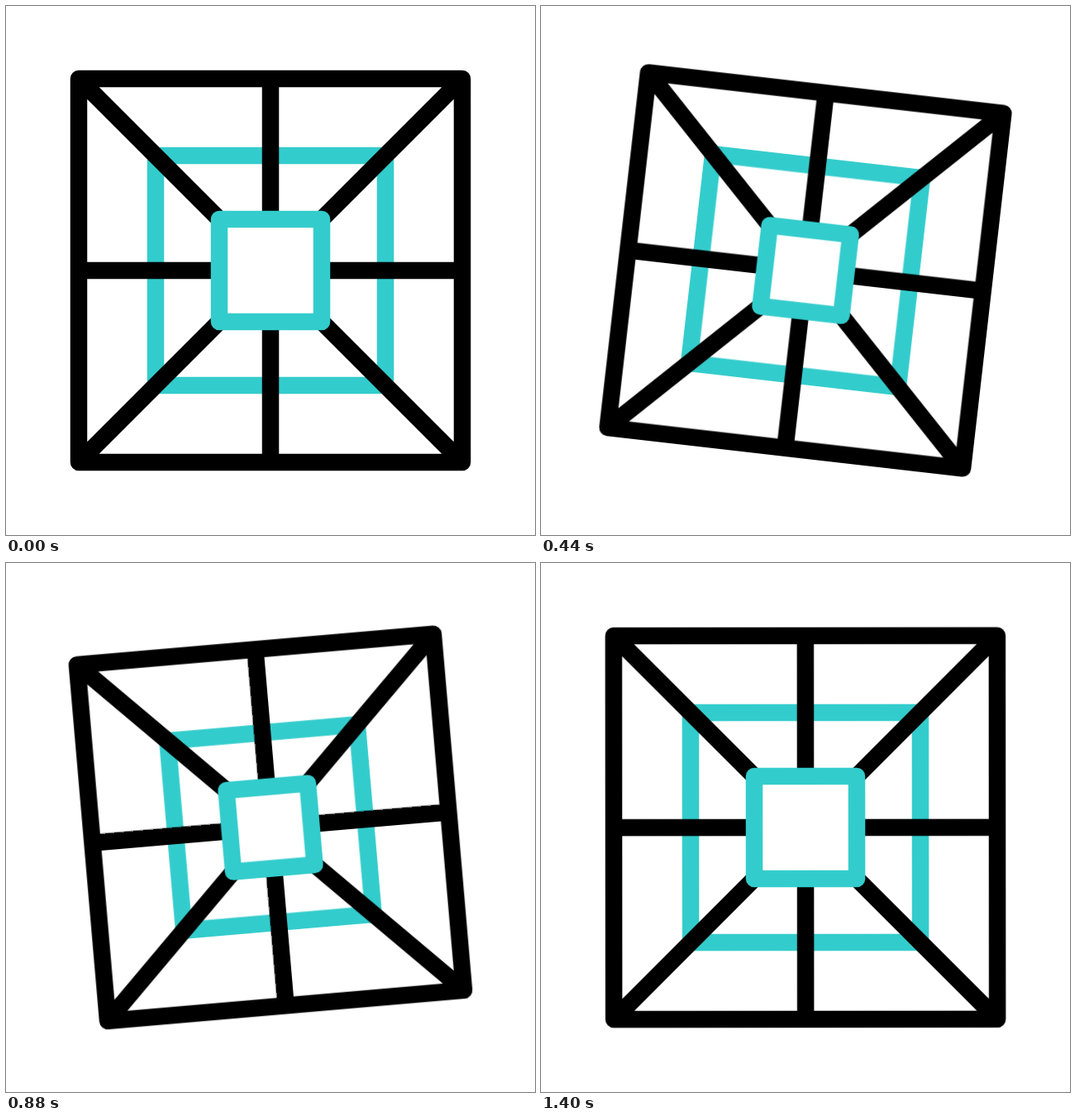
Write an HTML page that moves like this. It is 640 by 640 pixels and loops after 1.44 s.

```html
<!DOCTYPE html>
<html lang="en">
<head>
<meta charset="utf-8">
<title>Swaying square</title>
<style>
  html, body { margin: 0; width: 100%; height: 100%; overflow: hidden; background: #fff; }
  svg { display: block; width: 100vw; height: 100vh; }
  path, rect {
    fill: none;
    stroke: #000;
    stroke-width: 20.5px;
    stroke-linecap: round;
    stroke-linejoin: round;
    vector-effect: non-scaling-stroke;
  }
  .teal { stroke: #3cc; }
  .core { fill: #fff; }
  .sway, .frame, .ring, .core {
    transform-origin: 0 0;
    animation: 1440ms cubic-bezier(.333, 0, .667, 1) infinite;
  }
  .sway { animation-name: sway; }
  .frame { --small: .9; animation-name: shrink; }
  .core { --small: .7; animation-name: shrink; }
  .ring { --small: .8; animation-name: shrink-late; }

  @keyframes sway {
    0%, 3.5% { transform: rotate(0deg); }
    35.6% { transform: rotate(7deg); }
    58.3% { transform: rotate(-5deg); }
    99.3%, 100% { transform: rotate(0deg); }
  }
  @keyframes shrink {
    0%, 12.4% { transform: scale(1); }
    41.5%, 49.4% { transform: scale(var(--small)); }
    80.5%, 100% { transform: scale(1); }
  }
  @keyframes shrink-late {
    0%, 17.5% { transform: scale(1); }
    46.7%, 53.8% { transform: scale(var(--small)); }
    85.1%, 100% { transform: scale(1); }
  }
</style>
</head>
<body>
<svg viewBox="-320 -320 640 640">
  <g class="sway">
    <rect class="ring teal" x="-139" y="-139" width="278" height="278"/>
    <!-- The spokes cross the centre; the filled core hides the crossing. -->
    <path class="frame" d="M-232-232H232V232H-232ZL232 232M232-232L-232 232M0-232V232M-232 0H232"/>
    <rect class="core teal" x="-62" y="-62" width="124" height="124"/>
  </g>
</svg>
</body>
</html>
```
